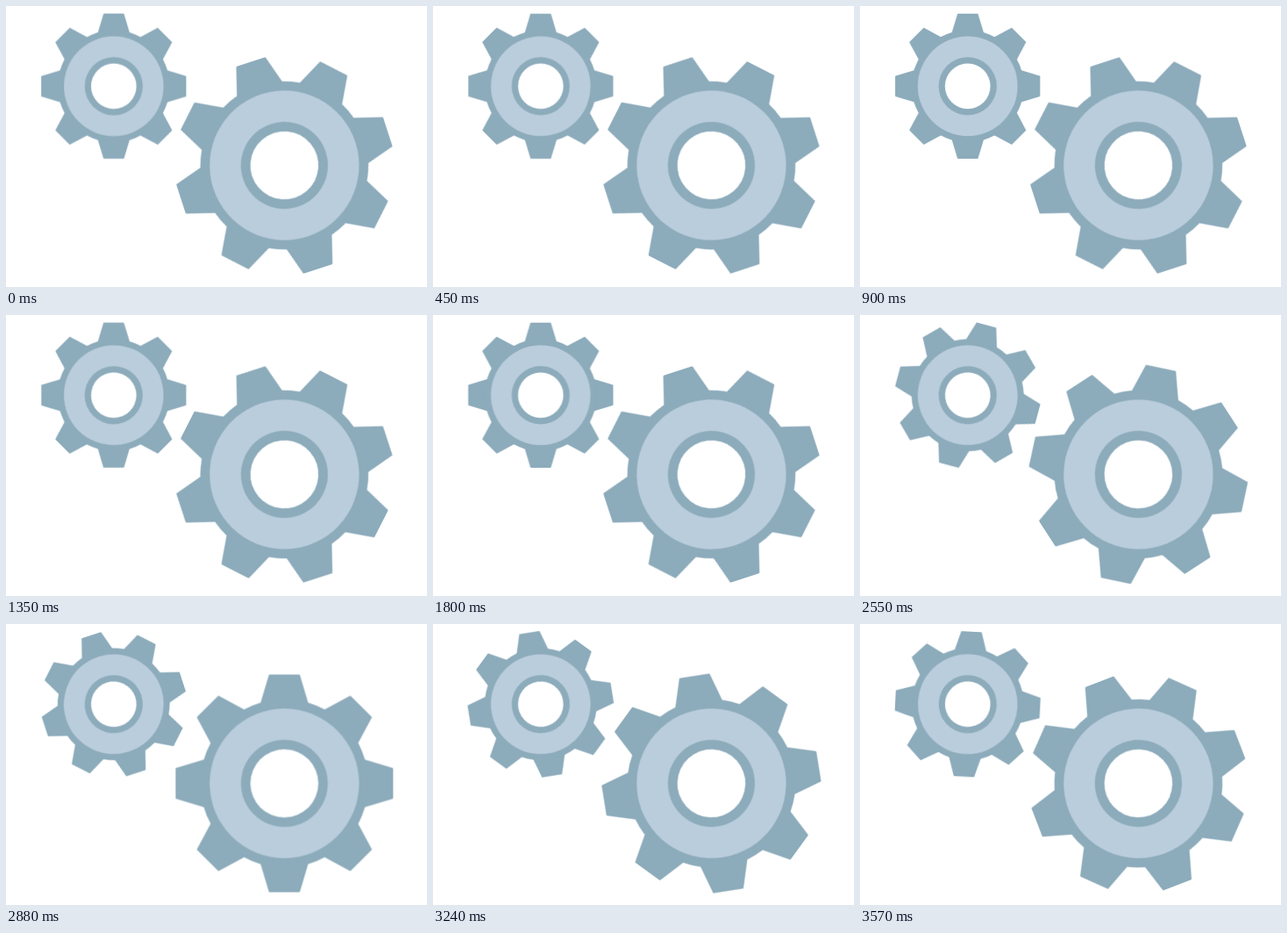
An HTML page that plays this animation: 480 px wide and 320 px high, repeating every 3600 ms.

```html
<!DOCTYPE html>
<html lang="en">
<head>
<meta charset="utf-8">
<title>Gears</title>
<style>
  html, body { margin: 0; width: 100%; height: 100%; overflow: hidden; background: #fff; }
  svg { display: block; width: 480px; height: 320px; }
  .dark { fill: #8cabbb; }
  .light { fill: #bacddc; }
  .hole { fill: #fff; }
  /* the thin stroke softens the tooth corners */
  .teeth { stroke: #8cabbb; stroke-width: 2; stroke-linejoin: round; }
  .spin { transform-origin: 0 0; animation: 3.6s steps(120) infinite; }
  .cw { animation-name: cw; }
  .ccw { animation-name: ccw; }
  @keyframes cw { from { transform: rotate(-18deg); } to { transform: rotate(342deg); } }
  @keyframes ccw { from { transform: rotate(0deg); } to { transform: rotate(-360deg); } }
</style>
</head>
<body>
<svg viewBox="0 0 480 320">
  <defs>
    <polygon id="pair" points="-26,-92 -16.7,-122.9 16.7,-122.9 26,-92 26,92 16.7,122.9 -16.7,122.9 -26,92"/>
    <g id="gear">
      <g class="dark teeth">
        <use href="#pair"/>
        <use href="#pair" transform="rotate(45)"/>
        <use href="#pair" transform="rotate(90)"/>
        <use href="#pair" transform="rotate(135)"/>
      </g>
      <circle class="dark" r="95.8"/>
      <circle class="light" r="85.2"/>
      <circle class="dark" r="49.6"/>
      <circle class="hole" r="38.8"/>
    </g>
  </defs>
  <g transform="translate(122.8 91.3) scale(.6667)">
    <g class="spin ccw"><use href="#gear"/></g>
  </g>
  <g transform="translate(317.4 181.5)">
    <g class="spin cw"><use href="#gear"/></g>
  </g>
</svg>
</body>
</html>
```
